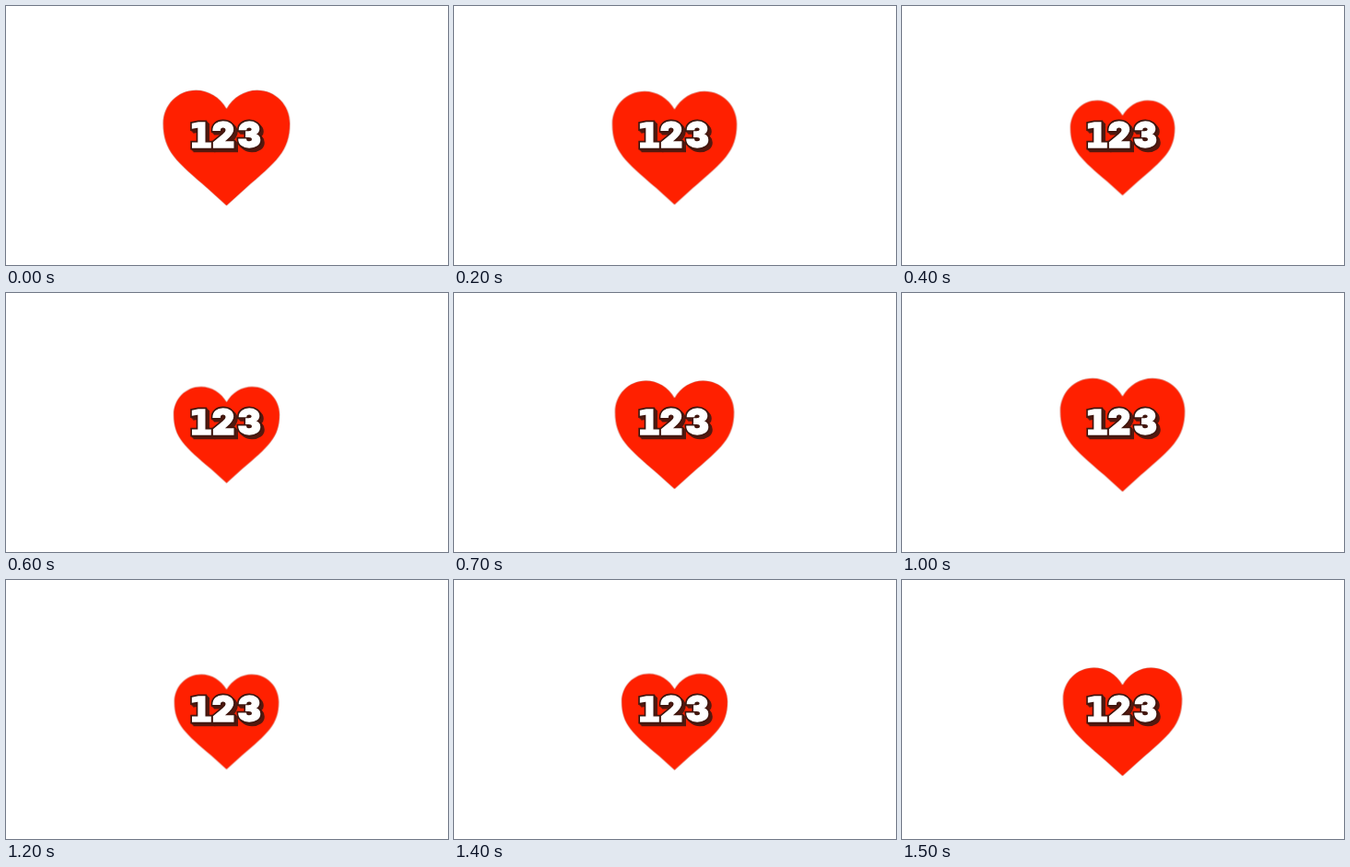
These frames come from a looping animation (480x282 px, 1600 ms). An HTML page:

```html
<!DOCTYPE html>
<html lang="en">
<head>
<meta charset="utf-8">
<title>Beating heart</title>
<style>
html, body { margin: 0; width: 100%; height: 100%; overflow: hidden; background: #fff; }
svg { display: block; width: 480px; height: 282px; }
.heart {
  fill: #ff2000;
  stroke: rgba(90, 40, 30, .35);
  stroke-width: .5;
  animation: beat 800ms step-end infinite;
}
@keyframes beat {
  0%, 100% { transform: scale(1.004); }
  12.5% { transform: scale(1.018); }
  25% { transform: scale(.986); }
  37.5% { transform: scale(.907); }
  50% { transform: scale(.827); }
  62.5% { transform: scale(.803); }
  75% { transform: scale(.839); }
  87.5% { transform: scale(.942); }
}
text { font: 900 38px Inter, sans-serif; text-anchor: middle; stroke-linejoin: miter; stroke-miterlimit: 2; }
.slab { font-family: "DejaVu Sans", sans-serif; }
.side { fill: #54190f; stroke: #54190f; stroke-width: 4.4; }
.edge { fill: #40170f; stroke: #40170f; stroke-width: 4.8; }
.face { fill: #fff; stroke: #fff; stroke-width: 1.4; }
</style>
</head>
<body>
<svg viewBox="0 0 480 282">
  <defs>
    <text id="count" y="153.8"><tspan class="slab" x="211.4">1</tspan><tspan x="236">2</tspan><tspan x="264.3">3</tspan></text>
  </defs>
  <g transform="translate(239.5 154.3)">
    <path class="heart" d="M0-42.2C-7-54.5-19.5-62.3-33-62.3C-53-62.3-68.5-46.3-68.5-26.3C-68.5 4-53.5 15.5-20 44.5L0 62.7L20 44.5C53.5 15.5 68.5 4 68.5-26.3C68.5-46.3 53-62.3 33-62.3C19.5-62.3 7-54.5 0-42.2Z"/>
  </g>
  <g class="side">
    <use href="#count" x="3" y="3"/>
    <use href="#count" x="2" y="2"/>
    <use href="#count" x="1" y="1"/>
  </g>
  <use class="edge" href="#count"/>
  <use class="face" href="#count"/>
</svg>
</body>
</html>
```
